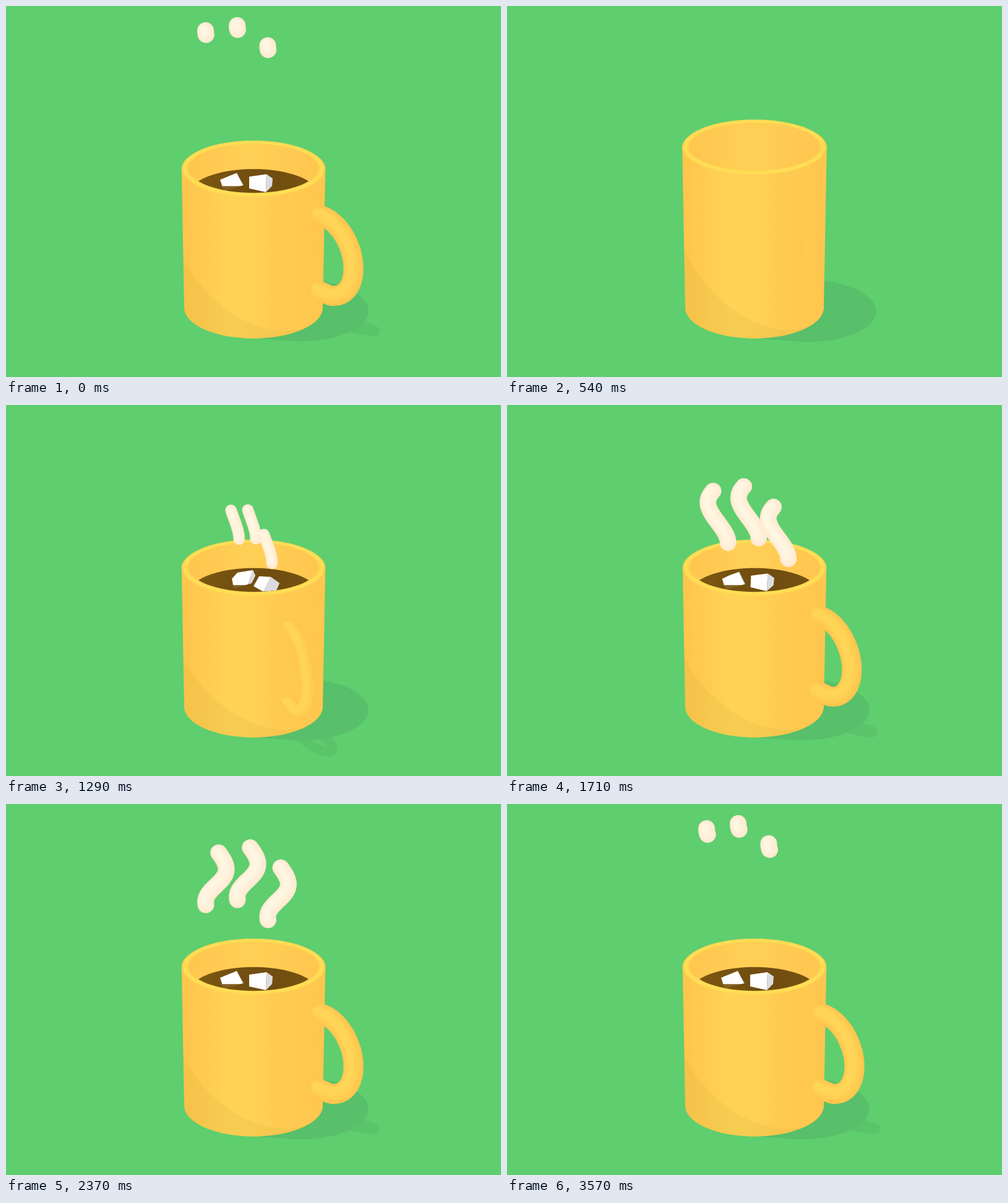
These frames come from a looping animation (800x600 px, 3600 ms). An HTML page with a canvas:

```html
<!DOCTYPE html>
<html lang="en">
<head>
<meta charset="utf-8">
<title>Hot mug</title>
<style>
  html, body { margin: 0; width: 100%; height: 100%; overflow: hidden; background: #5fce6e; }
  canvas { display: block; }
</style>
</head>
<body>
<canvas id="stage" width="800" height="600"></canvas>
<script>
const ctx = document.getElementById('stage').getContext('2d');
const LOOP = 3600, TAU = Math.PI * 2;
const CX = 400, GROUND = 486, DIST = 3000, SIN = 0.446, COS = 0.89;
const R = 112, H = 243, LIGHT_X = 0.3, LIGHT_Z = 0.04;
const REST = 28.3, FRONT = 62;

const mix = (a, b, k) => a + (b - a) * k;
const span = (t, a, b) => Math.min(1, Math.max(0, (t - a) / (b - a)));
const sineOut = u => Math.sin(u * Math.PI / 2);
const quadOut = u => 1 - (1 - u) ** 2;
const quadInOut = u => u < 0.5 ? 2 * u * u : 1 - 2 * (1 - u) ** 2;
const backOut = u => 1 + 2.2 * (u - 1) ** 3 + 1.2 * (u - 1) ** 2;

// Perspective camera looking down at the origin on the ground.
function project(x, y, z) {
  const k = DIST / (DIST - y * SIN - z * COS);
  return [CX + x * k, GROUND - (y * COS - z * SIN) * k];
}
const castShadow = (x, y, z) => project(x + y * LIGHT_X, 0, z + y * LIGHT_Z);

function trace(points, close) {
  ctx.beginPath();
  points.forEach(p => ctx.lineTo(p[0], p[1]));
  if (close) ctx.closePath();
}
function fill(points, style) {
  trace(points, true);
  ctx.fillStyle = style;
  ctx.fill();
}
function ring(y, r, dx = 0, dz = 0) {
  return Array.from({ length: 72 }, (_, i) => {
    const a = i / 72 * TAU;
    return project(r * Math.cos(a) + dx, y, r * Math.sin(a) + dz);
  });
}
function stroke(points, width, style) {
  trace(points);
  ctx.lineWidth = width;
  ctx.lineCap = ctx.lineJoin = 'round';
  ctx.strokeStyle = style;
  ctx.stroke();
}
// Rounded tube: stacked strokes that narrow towards the lit side.
function tube(points, width, edge, core) {
  const steps = 8;
  for (let i = 0; i < steps; i++) {
    const k = i / (steps - 1), d = -k * width * 0.13;
    const rgb = edge.map((c, j) => Math.round(mix(c, core[j], k)));
    stroke(points.map(p => [p[0] + d, p[1] + d]), width * (1 - k * 0.68), `rgb(${rgb})`);
  }
}
function sideGradient(r, colors) {
  const g = ctx.createLinearGradient(CX - r, 0, CX + r, 0);
  colors.forEach((c, i) => g.addColorStop(i / (colors.length - 1), c));
  return g;
}

function pose(t) {
  const grown = 1.18 * sineOut(span(t, 25, 630));
  return {
    radius: R * quadOut(span(t, 25, 430)),
    height: H * (grown - 0.18 * quadInOut(span(t, 630, 870))),
    level: H * (0.9 * sineOut(span(t, 330, 700)) - 0.08 * quadInOut(span(t, 700, 950))),
    angle: mix(REST, 68, quadInOut(span(t, 500, 1080))) - (68 - REST) * quadInOut(span(t, 1080, 1860)),
    handle: backOut(span(t, 540, 730)),
    sink: 45 * (1 - sineOut(span(t, 600, 900)))
  };
}

// Half loop that bulges outwards near its foot.
function handleCurve(p, place) {
  const a = p.angle * Math.PI / 180, k = p.height / H, pts = [];
  const add = (r, y) => {
    const q = mix(92, r, p.handle);
    pts.push(place(q * Math.cos(a), y * k, q * Math.sin(a)));
  };
  for (let i = 0; i <= 32; i++) {
    const b = Math.PI * (0.5 - i / 32);
    add(126 - 10 * Math.sin(b) + 49 * Math.cos(b), 119 + 67 * Math.sin(b));
  }
  add(116, 56);
  return pts;
}

function drawShadow(p) {
  if (p.handle > 0.02) stroke(handleCurve(p, castShadow), 15 * p.handle, '#5ac46b');
  const dx = p.height * LIGHT_X, dz = p.height * LIGHT_Z, color = '#58bf6a';
  fill(ring(0, p.radius, dx, dz), color);
  fill([project(0, 0, -p.radius), project(dx, 0, dz - p.radius),
        project(dx, 0, dz + p.radius), project(0, 0, p.radius)], color);
}

function drawBody(p) {
  const { radius: r, height: h } = p;
  const paint = sideGradient(r, ['#ffc54d', '#ffcc52', '#ffd357', '#ffd156', '#ffcb52', '#ffc950', '#ffc64f']);
  fill(ring(0, r), paint);
  fill([project(-r, 0, 0), project(-r, h, 0), project(r, h, 0), project(r, 0, 0)], paint);

  // Shaded area along the lower left.
  const upper = [], lower = [];
  for (let i = 0; i <= 40; i++) {
    const a = Math.PI * (1 - i / 40), s = Math.cos(a), z = r * Math.sin(a);
    upper.push(project(r * s, h * 0.41 * ((1 - s) / 2) ** 2, z));
    lower.unshift(project(r * s, 0, z));
  }
  fill(upper.concat(lower), 'rgba(215,180,60,.23)');

  fill(ring(h, r), sideGradient(r, ['#ffce50', '#ffd454', '#ffd454', '#ffcc50']));
  const lip = ring(h, r * 0.952);
  lip.push(lip[0]);
  stroke(lip, r * 0.06, '#ffd953');
  stroke(lip, r * 0.03, '#ffdf55');
}

// Corners of each face at rest, then turned to the front.
const CUBES = [
  { depth: 12, faces: [
    ['#ffffff', [346,281, 358,276, 373,270, 383,290, 352,299], [365,281, 374,271, 399,267, 391,290, 368,297]],
    ['#dcdce0', [373,270, 375,274, 384,290, 383,290], [399,267, 403,276, 397,288, 391,290]]
  ] },
  { depth: 2, faces: [
    ['#ffffff', [393,276, 421,272, 420,301, 393,295], [409,277, 428,278, 416,302, 400,293]],
    ['#dcdce0', [421,272, 431,279, 430,291, 420,301], [428,278, 442,288, 437,300, 416,302]]
  ] }
];

function drawCubes(p, waterY) {
  const turn = (p.angle - REST) / (FRONT - REST);
  for (const cube of CUBES) {
    const faces = cube.faces.map(([color, a, b]) => {
      const pts = [];
      for (let i = 0; i < a.length; i += 2) {
        pts.push([mix(a[i], b[i], turn), mix(a[i + 1], b[i + 1], turn) + p.sink]);
      }
      return { color, pts };
    });
    faces.forEach(f => fill(f.pts, 'rgba(255,235,210,.1)'));
    ctx.save();
    ctx.beginPath();
    ctx.rect(0, 0, 800, waterY - cube.depth);
    ctx.clip();
    faces.forEach(f => fill(f.pts, f.color));
    ctx.restore();
  }
}

function drawInside(p) {
  const r = p.radius * 0.902;
  ctx.save();
  trace(ring(p.height + 0.5, r), true);
  ctx.clip();
  ctx.fillStyle = sideGradient(r, ['#ffc64f', '#ffca52', '#ffcf55', '#ffce54', '#ffc952', '#ffc650']);
  ctx.fillRect(0, 0, 800, 600);
  if (p.level > H * 0.3) {
    fill(ring(p.level, r), sideGradient(r, ['#7d5911', '#745010', '#704d10', '#775411']));
    drawCubes(p, project(0, p.level, 0)[1]);
  }
  ctx.restore();
}

// Wisps rise along a cosine path that turns with the mug.
const WISPS = [[-69, 10], [-11, -7], [45, 17]];

function drawSteam(t, angle) {
  const top = 178 * span(t, 890, 2740), bottom = 178 * span(t, 1795, 3670);
  const width = 27 * quadOut(span(t, 890, 1790));
  if (width <= 0) return;
  const a = angle * Math.PI / 180;
  for (const [u, dy] of WISPS) {
    const pts = [];
    for (let i = 0; i <= 40; i++) {
      const h = mix(bottom, top, i / 40);
      const d = u + 19 * Math.cos(h / 118 * TAU);
      pts.push([CX + d * Math.cos(a), 221 - h + dy + d * Math.sin(a) * 0.32]);
    }
    tube(pts, width, [255, 233, 209], [255, 246, 225]);
  }
}

function draw(time) {
  let t = time % LOOP;
  if (t < 30) t += LOOP; // the full mug holds briefly before the cut
  ctx.fillStyle = '#5fce6e';
  ctx.fillRect(0, 0, 800, 600);
  const p = pose(t);
  if (p.radius > 0) {
    drawShadow(p);
    drawBody(p);
    drawInside(p);
    if (p.handle > 0.02) {
      const width = 20 + 14 * Math.cos(p.angle * Math.PI / 180);
      tube(handleCurve(p, project), width * Math.min(1, p.handle), [255, 197, 78], [255, 213, 87]);
    }
    drawSteam(t, p.angle);
  }
}

const start = performance.now();
function tick() {
  draw(performance.now() - start);
  requestAnimationFrame(tick);
}
tick();
</script>
</body>
</html>
```
